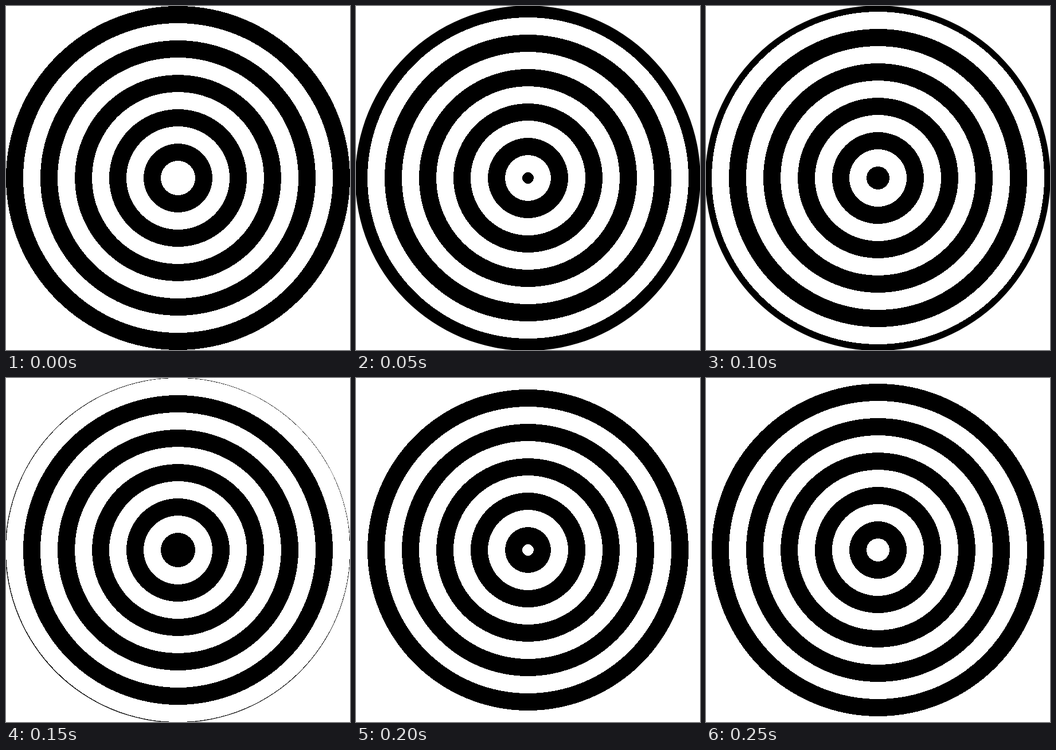
An HTML page that plays this animation: 600 px wide and 600 px high, repeating every 300 ms.

```html
<!DOCTYPE html>
<html lang="en">
<head>
<meta charset="utf-8">
<title>Expanding rings</title>
<style>
  html, body { margin: 0; width: 100%; height: 100%; overflow: hidden; background: #fff; }
  svg { display: block; width: 600px; height: 600px; }
  circle { shape-rendering: crispEdges; }
</style>
</head>
<body>
<svg viewBox="0 0 600 600">
  <g id="rings"></g>
  <!-- white surround with a round window, slightly off centre -->
  <path fill="#fff" fill-rule="evenodd"
    d="M-50-50H650V650H-50Z M-1.3 300.3a301 301 0 1 0 602 0a301 301 0 1 0 -602 0Z"/>
</svg>
<script>
  const LOOP = 300, STEPS = 6, GROWTH = 10;
  const PERIOD = STEPS * GROWTH, BAND = PERIOD / 2;
  const rings = document.getElementById('rings');

  function addDisc(start, color) {
    const disc = document.createElementNS('http://www.w3.org/2000/svg', 'circle');
    disc.setAttribute('cx', 300);
    disc.setAttribute('cy', 300);
    disc.setAttribute('fill', color);
    rings.append(disc);
    const frames = Array.from({ length: STEPS + 1 }, (_, i) => ({
      r: Math.max(0, start + i * GROWTH) + 'px',
      easing: 'step-end'
    }));
    disc.animate(frames, { duration: LOOP, iterations: Infinity });
  }

  // Largest first, so each smaller ring sits on top.
  for (let k = 5; k >= 0; k--) {
    addDisc(k * PERIOD, '#000');
    addDisc(k * PERIOD - BAND, '#fff');
  }
</script>
</body>
</html>
```
